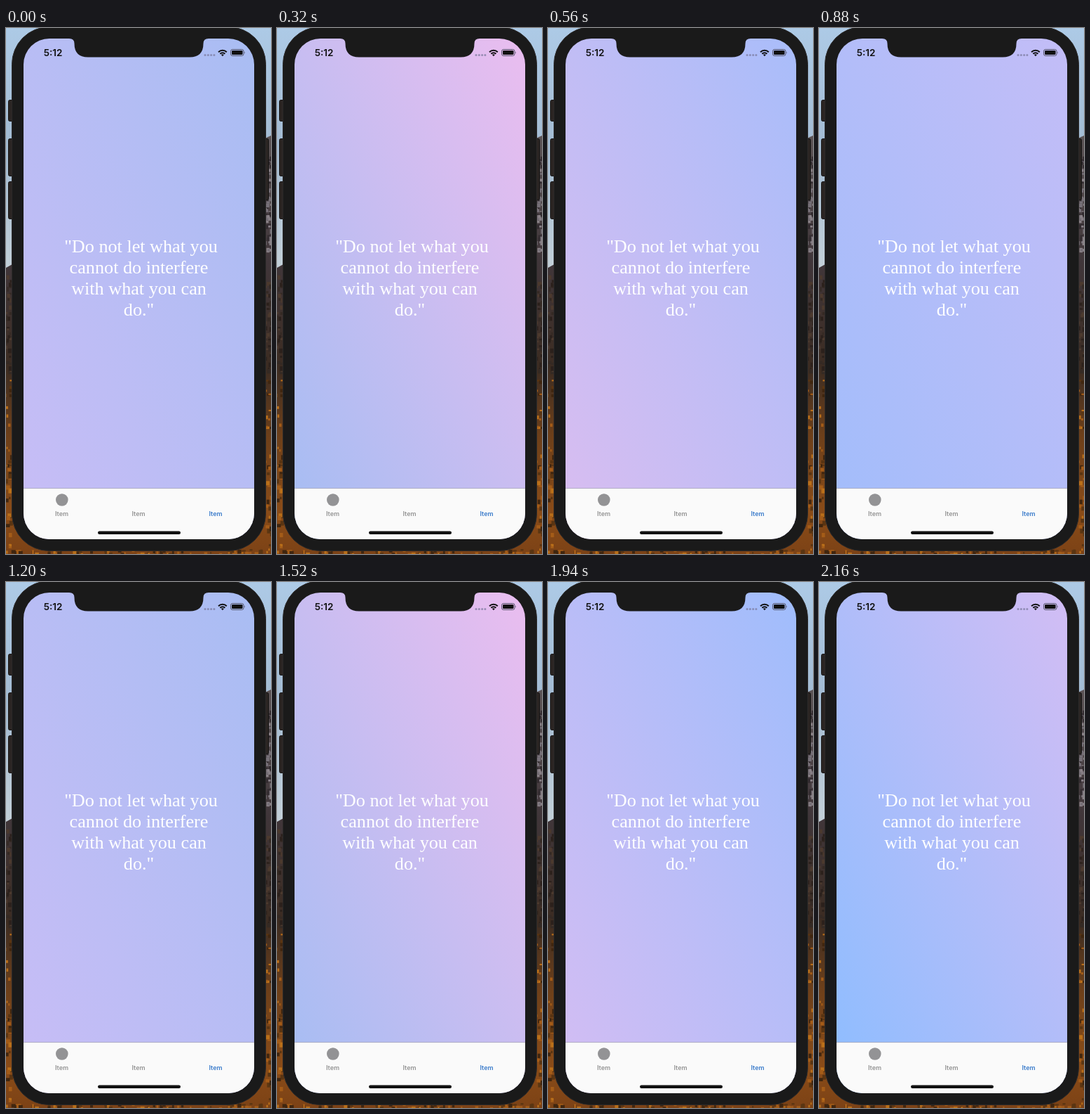
An HTML page that plays this animation: 378x748 px, repeating every 2180 ms.

```html
<!DOCTYPE html>
<html lang="en">
<head>
<meta charset="utf-8">
<title>Quote screen</title>
<style>
  html, body { margin: 0; width: 100%; height: 100%; overflow: hidden; background: #1a1a1a; }
  svg { display: block; width: 378px; height: 748px; }
  .quote { font: 26.2px "Liberation Serif", "Times New Roman", serif; fill: #fff; text-anchor: middle; }
  .clock { font: 600 13.5px Inter, "Liberation Sans", sans-serif; fill: #111; text-anchor: middle; }
  .tab { font: 600 9px Inter, "Liberation Sans", sans-serif; fill: #949494; text-anchor: middle; }
  .tab.on { fill: #3a7bcb; }
</style>
</head>
<body>
<svg viewBox="0 0 378 748">
  <defs>
    <linearGradient id="sky" x1="0" y1="0" x2="0" y2="1">
      <stop offset="0" stop-color="#adcae6"/>
      <stop offset=".5" stop-color="#a3bbd2"/>
      <stop offset="1" stop-color="#c3d0d8"/>
    </linearGradient>
    <linearGradient id="rock" x1="0" y1="155" x2="0" y2="748" gradientUnits="userSpaceOnUse">
      <stop offset="0" stop-color="#5b5355"/>
      <stop offset=".3" stop-color="#40363a"/>
      <stop offset=".55" stop-color="#3c2c22"/>
      <stop offset=".72" stop-color="#6e401a"/>
      <stop offset=".9" stop-color="#8a4c18"/>
      <stop offset="1" stop-color="#7c4216"/>
    </linearGradient>
    <!-- Bounding-box units keep the bands parallel to the screen diagonal. -->
    <linearGradient id="wash" x1="0" y1="1" x2="1" y2="0">
      <stop id="low" offset="0"/>
      <stop id="high" offset="1"/>
    </linearGradient>
    <clipPath id="screen"><rect x="25" y="15" width="329" height="712" rx="37"/></clipPath>
  </defs>

  <rect width="378" height="345" fill="url(#sky)"/>
  <path d="M0 341L9 336L200 250L369 157L378 153V748H0Z" fill="url(#rock)"/>
  <g id="flecks"></g>

  <g fill="#2b2523" stroke="#151414">
    <rect x="3.5" y="102.5" width="8" height="30" rx="2"/>
    <rect x="3.5" y="157.5" width="8" height="53" rx="2"/>
    <rect x="3.5" y="218.5" width="8" height="53" rx="2"/>
    <rect x="366.5" y="157.5" width="8" height="87" rx="2"/>
  </g>
  <rect x="8.5" y="-1.5" width="362" height="745" rx="53" fill="#1a1a1a" stroke="#2c2a2a"/>

  <g clip-path="url(#screen)">
    <rect x="25" y="15" width="329" height="712" fill="url(#wash)"/>
    <rect x="25" y="655" width="329" height="72" fill="#fafafa"/>
    <rect x="25" y="654.3" width="329" height=".8" fill="#aaa9b8"/>
  </g>
  <path d="M90 14H289V15Q281.5 15 281.5 22Q281.5 41.5 262 41.5H117Q97.500 41.500 97.500 22Q97.500 15 90 15Z" fill="#1a1a1a"/>

  <text class="clock" x="67" y="40">5:12</text>
  <g fill="#77779a" fill-opacity=".7">
    <circle cx="284" cy="38.500" r="1.500"/><circle cx="288.300" cy="38.500" r="1.500"/>
    <circle cx="292.600" cy="38.500" r="1.500"/><circle cx="296.900" cy="38.500" r="1.500"/>
  </g>
  <g fill="none" stroke="#111" stroke-width="2">
    <path d="M303 34.200A8.300 8.300 0 0 1 314.800 34.200"/>
    <path d="M305.400 36.800A5 5 0 0 1 312.400 36.800"/>
  </g>
  <path d="M306.900 38.100Q308.900 36.600 310.900 38.100L308.900 40.300Z" fill="#111"/>
  <rect x="320.500" y="30.500" width="18.500" height="9" rx="2.600" fill="none" stroke="#55556a"/>
  <rect x="322" y="32" width="15.500" height="6" rx="1.300" fill="#111"/>
  <path d="M340.200 33.400Q341.700 35 340.200 36.600Z" fill="#55556a"/>

  <g class="quote">
    <text x="192.500" y="319">"Do not let what you</text>
    <text x="189.500" y="349">cannot do interfere</text>
    <text x="189.500" y="379">with what you can</text>
    <text x="189.500" y="409">do."</text>
  </g>

  <circle cx="79.800" cy="671" r="8.800" fill="#939395"/>
  <text class="tab" x="79.500" y="694">Item</text>
  <text class="tab" x="189" y="694">Item</text>
  <text class="tab on" x="299" y="694">Item</text>
  <rect x="131" y="715.500" width="118" height="4.500" rx="2.250" fill="#111"/>
</svg>
<script>
  const LOOP = 2180, TICK = 20, STAGE = 300, START = 50;
  const COLORS = [[160, 189, 243], [242, 189, 238], [138, 189, 255], [212, 189, 244]];
  const low = document.getElementById('low');
  const high = document.getElementById('high');

  // Each corner walks round the palette; the lower one trails by a stage.
  function colorAt(ms) {
    const n = COLORS.length;
    const pos = ((ms - START) / STAGE + n) % n;
    const i = Math.floor(pos), f = pos - i;
    const next = COLORS[(i + 1) % n];
    return `rgb(${COLORS[i].map((c, k) => (c + (next[k] - c) * f).toFixed(1))})`;
  }

  function draw(now) {
    const t = Math.floor((now % LOOP) / TICK) * TICK;
    low.setAttribute('stop-color', colorAt(t - STAGE));
    high.setAttribute('stop-color', colorAt(t));
  }

  // Rocky texture in the narrow strips beside and below the phone.
  function scatter() {
    let seed = 7;
    const rand = () => (seed = (seed * 16807) % 2147483647) / 2147483647;
    const fleck = (x, y, tones) => {
      const fill = tones[Math.floor(rand() * tones.length)];
      return `<rect x="${x.toFixed(1)}" y="${y.toFixed(1)}" width="${(2 + rand() * 4).toFixed(1)}" height="${(2 + rand() * 5).toFixed(1)}" fill="${fill}"/>`;
    };
    const grey = ['#767078', '#332c30', '#8a8288'];
    const dark = ['#2c211c', '#4c3a2e', '#352a24'];
    const warm = ['#b96f1a', '#40260f', '#a45c18', '#5a3512'];
    let out = '';
    for (let i = 0; i < 50; i++) out += fleck(369 + rand() * 8, 165 + rand() * 150, grey);
    for (let i = 0; i < 70; i++) {
      const side = i % 2 ? 369 : -2;
      out += fleck(side + rand() * 8, 350 + rand() * 140, dark);
      out += fleck(side + rand() * 8, 500 + rand() * 245, warm);
    }
    for (let i = 0; i < 70; i++) out += fleck(rand() * 376, 741 + rand() * 6, warm);
    document.getElementById('flecks').innerHTML = out;
  }

  scatter();
  const begin = performance.now();
  function frame() {
    draw(performance.now() - begin);
    requestAnimationFrame(frame);
  }
  frame();
</script>
</body>
</html>
```
